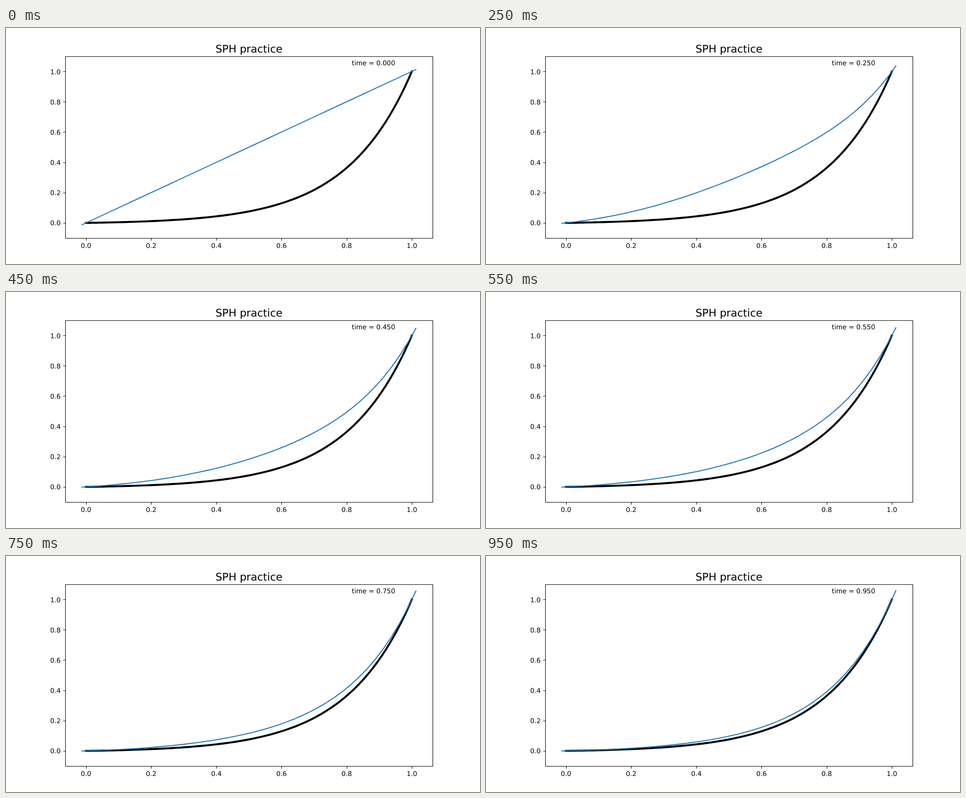
An HTML page for the animation above (1 s loop, 1000x500 px).

```html
<!DOCTYPE html>
<html lang="en">
<head>
<meta charset="utf-8">
<title>SPH practice</title>
<style>
  html, body { margin: 0; width: 100%; height: 100%; overflow: hidden; background: #fff; }
  svg { display: block; width: 1000px; height: 500px; }
  text { font: 13.889px "DejaVu Sans", sans-serif; fill: #000; text-rendering: geometricPrecision; white-space: pre; }
  .title { font-size: 22.222px; text-anchor: middle; }
  .xlabel { text-anchor: middle; }
  .ylabel { text-anchor: end; }
  path { fill: none; stroke: #000; }
  .axes { stroke-width: 1.11; }
  .curve { stroke-linecap: square; stroke-linejoin: round; }
  #steady { stroke-width: 4.167; }
  #wave { stroke: #1f77b4; stroke-width: 2.083; }
</style>
</head>
<body>
<svg id="plot" viewBox="0 0 1000 500">
  <path id="steady" class="curve"/>
  <path id="wave" class="curve"/>
  <path id="ticks" class="axes"/>
  <path class="axes" d="M125.5 60.5H900.5V445.5H125.5Z"/>
  <text class="title" x="512.5" y="52">SPH practice</text>
  <text id="clock" x="729.5" y="79"></text>
</svg>
<script>
const STEP_MS = 50, STEPS = 20;
const SPEED = 1, DIFFUSION = 0.2, PECLET = SPEED / DIFFUSION;
const CELLS = 40, MODES = 40, SAMPLES = 400;

const byId = id => document.getElementById(id);
const px = x => 125 + (x + 0.06375) * 775 / 1.1275;
const py = y => 445 - (y + 0.1) * 385 / 1.2;
const toPath = points =>
  "M" + points.map(([x, y]) => px(x).toFixed(2) + " " + py(y).toFixed(2)).join("L");

// Steady state of u_t + SPEED u_x = DIFFUSION u_xx with u(0) = 0, u(1) = 1
const steady = x => Math.expm1(PECLET * x) / Math.expm1(PECLET);

// Sine coefficients of the initial straight line's distance from it
const modes = Array.from({ length: MODES }, (_, i) => {
  const k = (i + 1) * Math.PI;
  let sum = 0;
  for (let j = 1; j < SAMPLES; j++) {
    const x = j / SAMPLES;
    sum += (x - steady(x)) * Math.exp(-PECLET * x / 2) * Math.sin(k * x);
  }
  return { k, amp: 2 * sum / SAMPLES, rate: SPEED * PECLET / 4 + DIFFUSION * k * k };
});

function solve(x, t) {
  if (t === 0) return x;
  // Points outside the walls mirror their inner neighbours
  if (x < 0) return -solve(-x, t);
  if (x > 1) return 2 - solve(2 - x, t);
  const sum = modes.reduce((s, m) => s + m.amp * Math.sin(m.k * x) * Math.exp(-m.rate * t), 0);
  return steady(x) + Math.exp(PECLET * x / 2) * sum;
}

function addLabel(cls, x, y, value) {
  const label = document.createElementNS("http://www.w3.org/2000/svg", "text");
  label.setAttribute("class", cls);
  label.setAttribute("x", x);
  label.setAttribute("y", y);
  label.textContent = value.toFixed(1);
  byId("plot").append(label);
}

let ticks = "";
for (let i = 0; i <= 5; i++) {
  const v = i / 5, x = px(v), y = py(v);
  ticks += `M${Math.round(x) + 0.5} 445.5v5M125.5 ${Math.round(y) + 0.5}h-5`;
  addLabel("xlabel", x, 466, v);
  addLabel("ylabel", 115.3, Math.ceil(y) + 5, v);
}
byId("ticks").setAttribute("d", ticks);
byId("steady").setAttribute("d",
  toPath(Array.from({ length: 101 }, (_, i) => [i / 100, steady(i / 100)])));

const waves = Array.from({ length: STEPS }, (_, s) =>
  toPath(Array.from({ length: CELLS + 2 }, (_, i) => {
    const x = (i - 0.5) / CELLS;
    return [x, solve(x, s * STEP_MS / 1000)];
  })));

let shown = -1;
function draw() {
  const step = Math.floor(performance.now() / STEP_MS) % STEPS;
  if (step !== shown) {
    shown = step;
    byId("wave").setAttribute("d", waves[step]);
    byId("clock").textContent = "time = " + (step * STEP_MS / 1000).toFixed(3);
  }
  requestAnimationFrame(draw);
}
draw();
</script>
</body>
</html>
```
